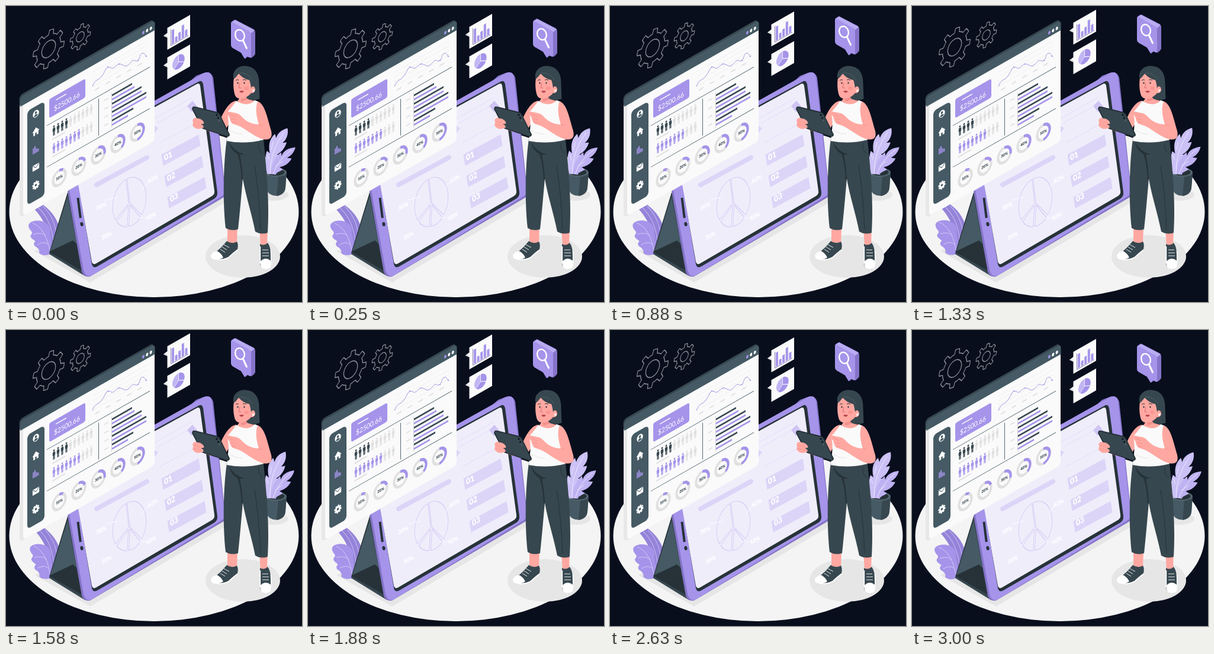
An HTML page with a canvas that plays this animation: 500 px wide and 500 px high, repeating every 3.04 s.

```html
<!DOCTYPE html>
<html lang="en">
<head>
<meta charset="utf-8">
<title>Dashboard illustration</title>
<style>
html, body { margin: 0; width: 100%; height: 100%; overflow: hidden; background: #080e1c; }
canvas { display: block; width: 500px; height: 500px; }
</style>
</head>
<body>
<canvas id="stage"></canvas>
<script>
const LOOP = 3040, CYCLE = 3000, TAU = Math.PI * 2;
const NIGHT = '#080e1c', DARK = '#37474f', SLATE = '#455a64', DEEP = '#263238',
  VIOLET = '#a594ea', SHADE = '#8574c8', LILAC = '#cbc1f6', PALE = '#dcd5f7',
  SKIN = '#ffa8a1', BLUSH = '#f28f8b', WHITE = '#ffffff', GREY = '#e0e0e0';
const SLOPE = -0.57;
const canvas = document.getElementById('stage');
const ctx = canvas.getContext('2d');
const dpr = window.devicePixelRatio || 1;
canvas.width = canvas.height = 500 * dpr;

function fill(color, d) {
  ctx.fillStyle = color;
  ctx.fill(new Path2D(d));
}
function line(color, width, d) {
  ctx.strokeStyle = color;
  ctx.lineWidth = width;
  ctx.stroke(new Path2D(d));
}
function oval(color, x, y, rx, ry = rx, turn = 0) {
  ctx.fillStyle = color;
  ctx.beginPath();
  ctx.ellipse(x, y, rx, ry, turn, 0, TAU);
  ctx.fill();
}
function box(color, x, y, w, h, r = 0) {
  ctx.fillStyle = color;
  ctx.beginPath();
  ctx.roundRect(x, y, w, h, r);
  ctx.fill();
}
function label(text, color, font) {
  ctx.fillStyle = color;
  ctx.font = font + ' Lato, Inter, sans-serif';
  ctx.textAlign = 'center';
  ctx.textBaseline = 'middle';
  ctx.fillText(text, 0, 0);
}
function using(m, draw) {
  ctx.save();
  ctx.transform(...m);
  draw();
  ctx.restore();
}
const shift = (x, y, draw) => using([1, 0, 0, 1, x, y], draw);
const iso = (x, y, draw) => using([0.866, -0.494, 0, 1, x, y], draw);
function sway(x, y, angle, draw) {
  ctx.save();
  ctx.translate(x, y);
  ctx.rotate(angle);
  ctx.translate(-x, -y);
  draw();
  ctx.restore();
}

function gear(r, root, hole, teeth, color, width) {
  ctx.beginPath();
  for (let i = 0; i < teeth; i++) {
    const a = (i + 0.25) * TAU / teeth, s = TAU / teeth;
    ctx.arc(0, 0, root, a - s * 0.5, a - s * 0.26);
    ctx.lineTo(r * Math.cos(a - s * 0.17), r * Math.sin(a - s * 0.17));
    ctx.arc(0, 0, r, a - s * 0.17, a + s * 0.17);
    ctx.lineTo(root * Math.cos(a + s * 0.26), root * Math.sin(a + s * 0.26));
  }
  ctx.closePath();
  ctx.moveTo(hole, 0);
  ctx.arc(0, 0, hole, 0, TAU);
  ctx.strokeStyle = color;
  ctx.lineWidth = width;
  ctx.stroke();
}

function gears(dy) {
  iso(72, 72.5 + dy, () => gear(30.5, 23.5, 13.5, 8, '#858991', 1.5));
  iso(125.5, 52 + dy, () => gear(20, 15, 7.8, 8, '#858991', 1.4));
}

function floor() {
  oval('#f4f4f4', 250, 347.5, 244.5, 144.5);
  oval('#e6e6e6', 400, 423, 63, 36);
  oval('#e6e6e6', 452, 319, 25, 10);
  fill('#e6e6e6', 'M48 414L75 402L140 452L371 318L382 325L142 467Z');
}

function leftPlant() {
  fill('#9483d8', 'M47 337L62 334C75 343 87 357 91 375C93 386 91 398 87 408L74 412C77 390 67 360 47 340Z');
  line('#c6bbf4', 1, 'M52 337Q80 359 81 408M64 338Q88 362 86 400');
  fill(VIOLET, 'M75 419C68 422 58 421 56 416C58 412 54 409 52 407C47 405 46 400 50 397C48 394 43 393 42 388C43 384 46 384 44 380C40 376 37 370 41 366C47 361 57 361 64 364C72 367 77 375 75 383C77 394 80 407 77 419Z');
  line('#d7cef8', 0.9, 'M46 366Q69 375 75 418M47 385Q61 381 68 388M53 403Q65 396 72 403');
}

function rightPlant(angle) {
  fill(SLATE, 'M438 281L440 307C441 325 471 325 472 307L474 281Z');
  fill(DARK, 'M460 288L474 282L472 307C471 315 465 320 457 321Z');
  oval('#546770', 456, 281, 18, 7.5);
  oval(DEEP, 456, 281, 14.5, 5.5);
  sway(455, 284, angle, () => {
    fill(LILAC, 'M441 284C438 267 436 256 440 245L445 249C441 230 447 222 453 216L455 223C458 213 466 208 474 206C476 216 473 225 466 231L473 230C470 241 464 247 457 251L464 252C459 263 451 272 451 284Z');
    fill('#bfb2f2', 'M447 284C448 267 454 255 464 247L465 253C468 243 478 239 488 238C486 247 480 253 474 256L482 257C477 267 468 271 462 272L468 276C460 281 456 281 456 285Z');
    line('#f0ecfd', 0.9, 'M446 284Q445 246 468 213M451 284Q460 258 482 242M444 260L441 251M447 244L450 230M455 271L467 262');
  });
}

function stand() {
  fill(DEEP, 'M104 315L73 417L133 454L142 430L119 330Z');
  fill(SLATE, 'M105 318L75 414L113 396L122 404Z');
  fill(DARK, 'M103 317L108 318L132 450L133 456L73 419L74 416L128 447Z');
}

function device() {
  fill(SHADE, 'M104 313L128 449Q131 459 142 457L368 323Q372 319 370 309L350 121Q346 109 334 113L321 118Z');
  fill(VIOLET, 'M106 306L131 446Q134 458 143 456L365 321Q371 317 369 308L348 121Q346 108 333 114L240 166Z');
  fill(DEEP, 'M123 305L145 436Q147 444 154 440L351 326Q358 322 357 314L333 132Q331 124 325 128L240 174Z');
  fill('#f0edfb', 'M121 296L145 432Q147 438 152 435L348 321Q353 318 352 312L328 135Q327 129 322 132L240 177Z');
  line(DEEP, 4, 'M121.5 324L125.8 358');
  oval(DEEP, 128, 368.5, 2.6, 3.6, -0.2);
  line('#e3dcfa', 1, 'M251 190L314 155M255 198L317 164M260 231L321 198');
  fill(PALE, 'M250 202L257 206L249 218Z');
  fill('#cfc5f3', 'M306 169L315 160L325 172L314 179Z');
  ctx.lineCap = 'round';
  line(PALE, 8, 'M153 302L238 256');
  ctx.lineCap = 'butt';
  const rows = ['01', '02', '03'];
  rows.forEach((text, i) => {
    shift(i * 5, i * 36, () => {
      fill(PALE, 'M262.5 251L325.5 217L328.5 236L265.5 270Z');
      using([0.88, -0.48, 0.14, 1, 274, 253.5 - i], () => label(text, WHITE, '900 13.5px'));
    });
  });
  using([0.866, -0.48, 0.12, 1, 209, 331], () => {
    line('#d2c9f3', 1, 'M0 -39A32 39 0 0 1 19 31L0 2ZM-2 -39L-2 1L-30 16A32 39 0 0 1 -2 -39ZM-3 4L-28 20A32 39 0 0 0 -10 37ZM0 5L-7 38Q7 42 16 34Z');
    line('#faf8ff', 1, 'M24 -8L43 -18M-20 -18L-43 -24M12 32L34 44');
  });
  for (const [text, x, y] of [['30%', 161, 338.5], ['63%', 248, 292.5], ['30%', 170, 388.5], ['10%', 245, 355.5]]) {
    using([0.866, -0.46, 0.13, 1, x, y], () => label(text, WHITE, '900 9.6px'));
  }
}

function person(x, v, color) {
  oval(color, x, v - 7, 1.4, 1.7);
  box(color, x - 2.2, v - 4.7, 4.4, 6.5, 1.4);
  box(color, x - 1.5, v, 1.3, 8.5, 0.6);
  box(color, x + 0.2, v, 1.3, 8.5, 0.6);
}

function icons() {
  ctx.lineJoin = 'round';
  iso(50.5, 182, () => {
    oval(WHITE, 0, 0, 6);
    oval(SLATE, 0, -1.8, 2.1);
    fill(SLATE, 'M-4 3Q0 -1 4 3Q0 7 -4 3Z');
  });
  iso(50.5, 212, () => fill(WHITE, 'M0 -7L7 0H5V6H1.5V2H-1.5V6H-5V0H-7Z'));
  iso(50.5, 242, () => {
    [10, 12, 7, 5].forEach((h, i) => box(VIOLET, -6 + i * 3.1, 6 - h, 2.3, h));
  });
  iso(50.5, 272, () => {
    box(WHITE, -6.5, -4.5, 13, 9.5, 1);
    line(SLATE, 1, 'M-6 -4L0 1L6 -4');
  });
  iso(50.5, 302.5, () => gear(6.2, 4.3, 2.8, 8, WHITE, 1.7));
}

function panel() {
  using([1, SLOPE, 0, 1, 0, 0], () => {
    box('#e8e8e8', 23, 176, 228, 195.5, 7);
    box('#fafafa', 29, 176, 222, 195.5, 6);
    box(DARK, 22.5, 164, 227, 19, 6);
    box(SLATE, 24, 167.5, 227.5, 16.5, [6, 5, 0, 0]);
    oval(VIOLET, 232, 177.3, 2, 2.8);
    oval(WHITE, 238.3, 177.3, 2, 2.8);
    oval(WHITE, 244.7, 177.3, 2, 2.8);
    box(SLATE, 36, 198, 29, 159, 6);
    box(VIOLET, 73, 199, 61, 32, 3);
    box(WHITE, 84, 206, 18, 1.7, 0.8);
    line(SLATE, 0.9, 'M69 241.5H243M69 311.5H243M156.5 246V308');

    for (let i = 0; i < 10; i++) {
      const x = 81 + i * 7;
      person(x, 256.5, i < 4 ? DARK : GREY);
      person(x, 286.5, i < 7 ? VIOLET : GREY);
    }
    box(GREY, 78, 269, 22, 2.2, 1);
    box(GREY, 78, 298.5, 22, 2.2, 1);

    ctx.setLineDash([1, 1.5]);
    line('#d6d6d6', 0.6, 'M147 195H238M147 203H238M147 211H238M147 219H238');
    ctx.setLineDash([]);
    for (let i = 0; i < 5; i++) box(GREY, 150 + i * 18, 226.5, 8, 2.2, 1);

    const ends = [213, 217, 229, 229, 237, 237, 215, 206];
    ends.forEach((end, i) => {
      const v = 251.5 + i * 7.1;
      box(i % 2 ? VIOLET : DARK, 179, v, end - 179, 3);
      if (i % 2 === 0) box(GREY, 166, v + 2, 7, 2, 1);
    });
    line('#b0b0b0', 0.5, 'M178.5 248V307');
  });

  iso(103, 161.8, () => label('$2500.66', WHITE, '400 11.8px'));
  line('#8f7ddb', 0.8, 'M146 136C149 128 152 126 156 124C161 121 165 114 168 108C170 103 174 102 178 105C182 107 186 99 191 98C196 97 199 103 204 101C210 98 212 92 215 92C219 91 219 95 223 92C227 87 226 81 230 80C234 79 235 82 237 86');
  for (const [x, y] of [[172, 103], [191, 98], [223, 92], [237, 85]]) oval(VIOLET, x, y, 1.1);

  for (let i = 0; i < 5; i++) {
    iso(90 + i * 33, 290 - i * 19.2, () => {
      const share = (i + 1) / 10;
      const ring = (color, from, to) => {
        ctx.beginPath();
        ctx.arc(0, 0, 12.3, from, to);
        ctx.strokeStyle = color;
        ctx.lineWidth = 4.6;
        ctx.stroke();
      };
      ring(GREY, 0, TAU);
      ring(VIOLET, -TAU / 4, -TAU / 4 + share * TAU);
      label((i + 1) * 10 + '%', DARK, '900 6.6px');
    });
  }
  icons();
}

function cards(dy) {
  shift(0, dy - 0.5, () => {
    for (const y of [0, 50]) {
      shift(0, y, () => {
        fill('#fafafa', 'M272.5 37.5L311 15.5V52.5L272.5 74.5V54L266 51L272.5 46Z');
        fill('#dedede', 'M272.5 46L266 51L272.5 54V51L269 50Z');
      });
    }
    line('#6f639c', 0.8, 'M278.5 40V67.5L308 50.5');
    using([1, SLOPE, 0, 1, 0, 0], () => {
      [24, 9, 13, 22, 11].forEach((h, i) => box(VIOLET, 280 + i * 5.6, 225 - h, 4, h));
    });
    iso(291.5, 95, () => {
      oval(VIOLET, 0, 0, 11.8);
      line(WHITE, 1, 'M0 -12V0L11 5M0 0L-9 8');
      fill('#c2b6f3', 'M-0.5 -11.8A11.8 11.8 0 0 0 -9 7.6L-0.5 0Z');
    });
  });
}

function bubble(dy) {
  shift(0, dy, () => {
    fill(SHADE, 'M380 29Q380 26 387 23L418 39Q421 41 421 45V81Q420 84 414 88L410 84L404 89L396 77Z');
    fill('#b9acf2', 'M380 28L387 23.5L420 41L414 46Z');
    fill(VIOLET, 'M380 30Q380 26 384 28L411 43Q414 45 414 49V85Q414 88 411 87L407 85L403 89L397 79L383 71Q380 69 380 66Z');
    ctx.lineCap = 'round';
    ctx.strokeStyle = WHITE;
    ctx.lineWidth = 2.4;
    ctx.beginPath();
    ctx.ellipse(395, 49.5, 7.6, 9.6, -0.35, 0, TAU);
    ctx.stroke();
    line(WHITE, 3, 'M400.5 58.5L406.5 71.5');
    ctx.lineCap = 'butt';
  });
}

function shoes() {
  fill(SKIN, 'M374 372L391 374L390 401L374 401ZM428 378L442 378L441 404L430 405Z');
  fill(DARK, 'M373 397Q381 403 390 398Q393 402 391 411Q383 417 376 424Q364 430 351 426L347 420Q358 414 366 405Z');
  fill(WHITE, 'M346 421Q350 414 357 414Q364 418 367 425Q355 431 347 426Z');
  line(WHITE, 1.8, 'M348 426Q364 432 377 424Q383 418 391 412');
  line('#e9edf0', 1, 'M365 407L373 412M362 411L370 416M368 403L377 408');
  fill(DARK, 'M429 402Q436 406 442 400Q447 407 447 418L448 435Q447 445 438 445Q429 443 429 434Z');
  fill(WHITE, 'M430 431Q438 423 447 430Q451 445 438 445Q428 444 430 431Z');
  line(WHITE, 1.4, 'M429.5 406V435M447.5 413L448 435');
  line('#e9edf0', 1, 'M433 412H443M433 417H444M433 422H444');
}

function woman() {
  shoes();
  fill(DARK, 'M373 225H435C438 257 446 324 442 383Q431 387 421 381C415 350 406 325 400 292C397 325 395 350 392 377Q381 381 371 375C366 330 367 267 373 225Z');
  fill(DEEP, 'M377 231Q387 247 402 250Q397 252 395 251Q399 270 400 292L398 294Q397 266 391 250Q380 244 377 231Z');
  line(DEEP, 1, 'M427 232Q425 244 434 249M420 270Q428 320 430 378');
  fill(SKIN, 'M388 160C376 163 368 178 362 192C354 199 341 196 333 190L329 204C344 216 365 216 373 205L386 185Z');
  fill(SKIN, 'M396 146L412 145L414 159Q425 160 427 165Q408 175 387 164Q396 158 396 146Z');
  fill(BLUSH, 'M397 155Q405 158 412 149L412 153Q406 161 397 161Z');
  fill('#fafafa', 'M389 160Q395 165 406 166Q416 165 420 159L427 162C425 172 428 185 433 194L435 226Q404 234 373 228C375 209 378 192 373 180Q381 172 389 160Z');
  line('#dedede', 0.8, 'M428 198Q423 211 428 218M377 209Q388 217 399 216');

  fill('#222e34', 'M315 171Q316 169 320 170L357 179Q360 180 362 184L378 217Q378 221 373 221L334 208Q330 207 329 203L314 174Z');
  fill(DARK, 'M317 171L357 181Q360 182 361 185L376 217Q376 220 372 219L335 207Q332 206 331 203L316 174Z');
  oval(NIGHT, 356, 184, 1.5);
  oval(NIGHT, 358.5, 189, 1.5);
  oval('#6d7b82', 360.5, 193.5, 0.9);
  shift(-0.8, 0.8, () => {
    fill(SKIN, 'M320 188L329 190Q336 194 335 198L330 199Q336 201 334 205L327 207Q319 207 316 201L317 195Q315 193 317 190Z');
    line(BLUSH, 0.7, 'M318 194L329 197M317 199L329 202');
  });

  fill(SKIN, 'M425 161C437 165 441 187 448 211C451 224 444 227 434 225C417 220 405 207 392 202L383 199C377 194 379 189 376 186L372 181Q373 177 379 179L389 181C396 182 399 190 408 195Q417 200 427 200C424 189 420 175 425 161Z');
  line(BLUSH, 0.8, 'M378 183L387 187M380 190L388 192M382 196L389 197M427 200L434 202');

  fill(DARK, 'M385 122C382 106 396 99 409 102C422 104 428 117 427.5 130L428.5 157Q416 161 408 157L390 132Z');
  fill(SKIN, 'M386 117C383 128 384 143 387 151Q390 158 399 156Q409 154 414 147Q420 148 421 141Q420 134 414 136L415 118Q400 111 386 117Z');
  fill(DARK, 'M384 121Q382 107 398 103Q423 102 422 128L420 136Q415 134 414 139Q413 130 411 125Q400 123 393 114Q390 119 385.5 123Z');
  line('#566871', 0.7, 'M394 113Q408 112 416 125');
  oval(WHITE, 418, 143, 2);
  oval(DEEP, 391.5, 130, 1.1, 1.5);
  oval(DEEP, 402.5, 130, 1.1, 1.5);
  line(DEEP, 1, 'M388 126Q390 123.5 393 125M400 125Q403 123 406 125.5');
  line('#d9666a', 0.9, 'M395 130L393 138L397 138.5');
  fill('#b94450', 'M394 144Q398 142 402 144Q398 149 394 144Z');
  oval('rgba(242,120,118,.35)', 406, 139, 4, 3);
}

function draw(t) {
  const phase = Math.min(t, CYCLE) / CYCLE;
  const lift = -10 * (1 - Math.abs(2 * phase - 1));
  const drift = -7.5 * (1 - Math.cos(Math.PI * phase)) / 2;
  const lean = 0.03 * Math.cos(TAU * (t - 400) / CYCLE);
  ctx.setTransform(dpr, 0, 0, dpr, 0, 0);
  ctx.fillStyle = NIGHT;
  ctx.fillRect(0, 0, 500, 500);
  floor();
  gears(drift);
  sway(76, 419, -lean, leftPlant);
  stand();
  device();
  panel();
  cards(lift);
  bubble(lift);
  rightPlant(lean);
  woman();
}

const start = performance.now();
function tick() {
  draw((performance.now() - start) % LOOP);
  requestAnimationFrame(tick);
}
tick();
</script>
</body>
</html>
```
